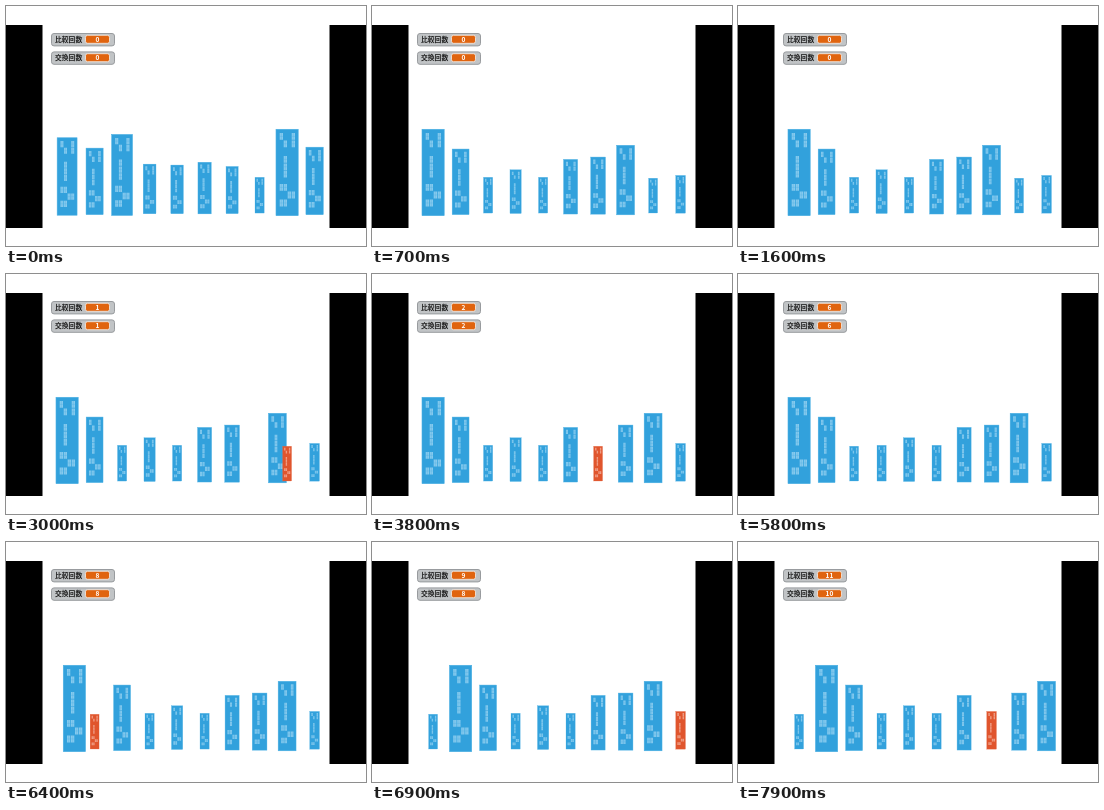
Write an HTML page that moves like this. It is 360 px wide and 240 px high and loops after 8000 ms.

```html
<!DOCTYPE html>
<html lang="ja">
<head>
<meta charset="utf-8">
<style>
  html, body { margin: 0; width: 100%; height: 100%; overflow: hidden; background: #fff; }
  svg { display: block; width: 360px; height: 240px; }
  text { font-family: "Noto Sans CJK JP", "Noto Sans CJK", "Noto Sans", sans-serif; font-weight: 700; }
  .name { font-size: 6.8px; fill: #222; }
  .count { font-size: 6.6px; fill: #fff; text-anchor: middle; }
  .bar { --wall: #32a1dc; --edge: #4bb0e3; --pane: #86caee; }
  .bar.active { --wall: #e0552d; --edge: #e5704c; --pane: #f0a58e; }
  .wall { fill: var(--wall); stroke: var(--edge); stroke-width: .6; }
  .pane { fill: var(--pane); }
  .sash { fill: none; stroke: var(--wall); stroke-width: .5; opacity: .45; }
</style>
</head>
<body>
<svg viewBox="0 0 360 240">
  <rect width="360" height="240" fill="#fff"/>
  <path d="M0 19H36.5V222H0ZM323.5 19H360V222H323.5Z"/>
  <g id="bars"></g>
  <g id="monitors"></g>
</svg>
<script>
const LOOP = 8000, TICK = 100;
const RESIZE_AT = 500;
const STEP = 495, COUNT_DELAY = 50, MOVE = 170, RED_END = 480;
const BASE_Y = 205.2;

const startHeights = [78, 67, 81.5, 50, 49, 52, 47.5, 36, 87, 68];
const sortHeights = [87, 66, 36, 44, 36, 55, 57.5, 70, 35, 38];

// Window positions on a 23 x 87 building.
const windows = [
  [4, 4], [16, 4], [16, 11.4], [8, 11.4], [8, 27], [8, 34.4], [8, 41.8],
  [4, 55], [8, 55], [12, 62.6], [16, 62.6], [4, 70.6], [8, 70.6]
];

const passes = [
  { at: 2840, from: 8, count: 8 },
  { at: 6880, from: 9, count: 3 }
];
const steps = passes.flatMap(p => Array.from({ length: p.count }, (_, i) =>
  ({ at: p.at + i * STEP, slot: p.from - i })));

const slotX = slot => 61.1 + 27.5 * slot;
const clamp = v => Math.max(0, Math.min(1, v));

function add(parent, tag, attrs) {
  const el = document.createElementNS("http://www.w3.org/2000/svg", tag);
  for (const key in attrs) el.setAttribute(key, attrs[key]);
  return parent.appendChild(el);
}

function makeBar() {
  const g = add(document.getElementById("bars"), "g", { class: "bar" });
  add(g, "rect", { class: "wall", x: .3, y: .3, width: 22.2, height: 86.4 });
  const panes = windows.map(([x, y]) => `M${x} ${y}h3.3v6.8h-3.3z`).join("");
  const sashes = windows.map(([x, y]) => `M${x} ${y + 3.4}h3.3M${x + 1.65} ${y}v6.8`).join("");
  add(g, "path", { class: "pane", d: panes });
  add(g, "path", { class: "sash", d: sashes });
  return g;
}

function makeMonitor(label, y) {
  const g = add(document.getElementById("monitors"), "g", { transform: `translate(45 ${y})` });
  add(g, "rect", { x: .5, y: .5, width: 63, height: 12.4, rx: 2.5, fill: "#c1c4c6", stroke: "#989b9e" });
  add(g, "text", { class: "name", x: 4, y: 8.9 }).textContent = label;
  add(g, "rect", { x: 34.5, y: 2.3, width: 24, height: 8, rx: 2, fill: "#e0640f", stroke: "#f5eee8", "stroke-width": .8 });
  return add(g, "text", { class: "count", x: 46.5, y: 8.7 });
}

const bars = sortHeights.map(makeBar);
const compared = makeMonitor("比較回数", 27);
const swapped = makeMonitor("交換回数", 45.4);

function draw(t) {
  const heights = t < RESIZE_AT ? startHeights : sortHeights;
  const order = bars.map((_, i) => i);
  const place = bars.map((_, i) => i);
  let comps = 0, swaps = 0, active = -1;

  for (const { at, slot } of steps) {
    const dt = t - at;
    if (dt < 0) break;
    const mover = order[slot], other = order[slot - 1];
    comps++;
    if (dt >= COUNT_DELAY) swaps++;
    active = dt < RED_END ? mover : -1;
    // The larger bar glides right first, then the smaller one glides left.
    place[other] = slot - 1 + clamp((dt - COUNT_DELAY) / MOVE);
    place[mover] = slot - clamp((dt - COUNT_DELAY - MOVE) / MOVE);
    order[slot] = other;
    order[slot - 1] = mover;
  }

  bars.forEach((bar, i) => {
    const scale = heights[i] / 87;
    const x = slotX(place[i]) - 11.4 * scale;
    const y = BASE_Y - heights[i] * .945;
    bar.setAttribute("transform", `translate(${x} ${y}) scale(${scale})`);
    bar.classList.toggle("active", i === active);
  });
  const top = bars[active];
  if (top && top.nextSibling) top.parentNode.appendChild(top);
  compared.textContent = comps;
  swapped.textContent = swaps;
}

const start = performance.now();
function frame() {
  const t = (performance.now() - start) % LOOP;
  draw(Math.floor(t / TICK) * TICK);
  requestAnimationFrame(frame);
}
draw(0);
requestAnimationFrame(frame);
</script>
</body>
</html>
```
